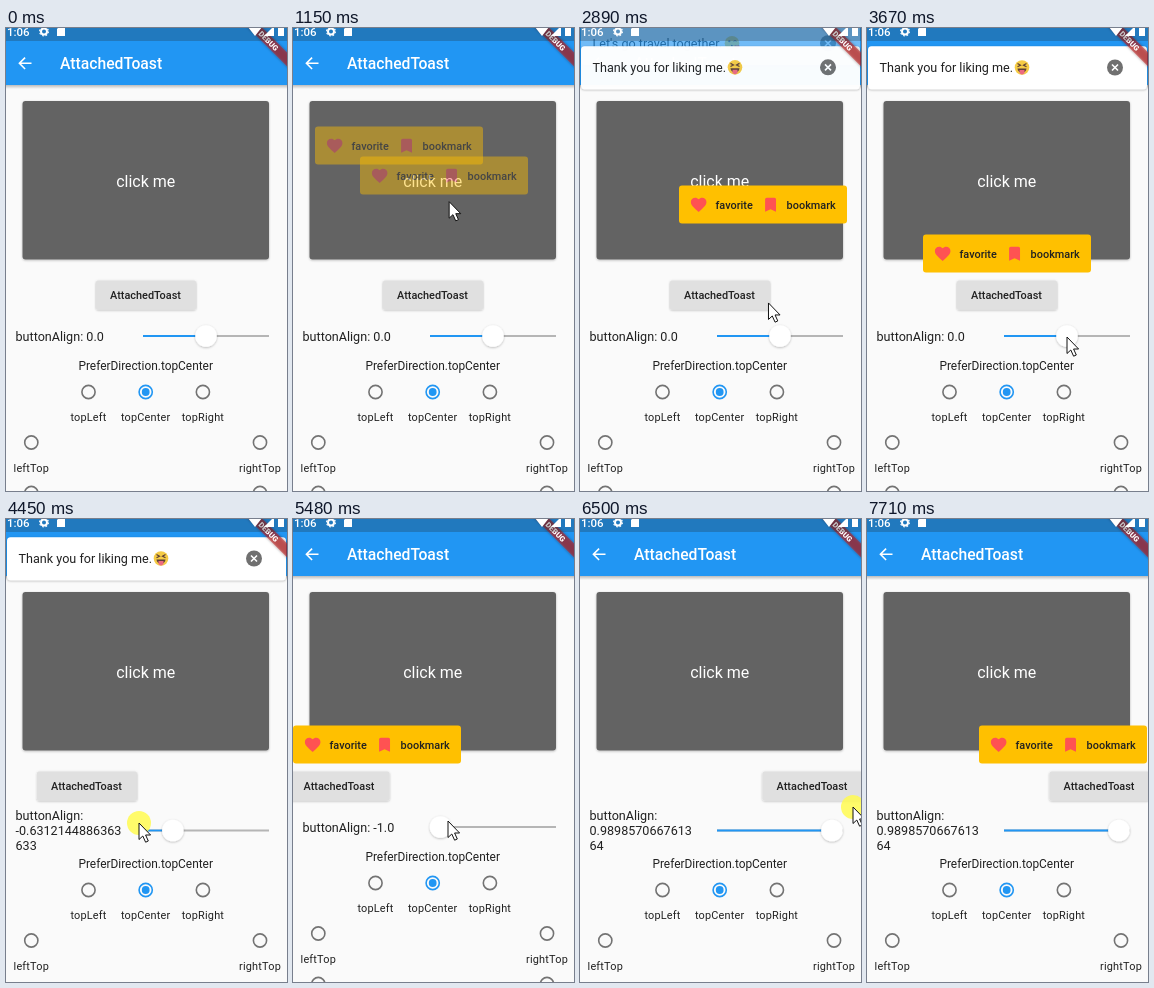
Write an HTML page that moves like this. It is 281 by 463 pixels and loops after 8000 ms.

```html
<!DOCTYPE html>
<html lang="en">
<head>
<meta charset="utf-8">
<title>AttachedToast</title>
<style>
html, body { margin: 0; width: 100%; height: 100%; overflow: hidden; background: #fafafa; }
svg { display: block; width: 281px; height: 463px; font-family: Roboto, sans-serif; fill: #212121; }
.bold { font-weight: 500; }
.mid { text-anchor: middle; }
.small { letter-spacing: .2px; }
.white { fill: #fff; }
</style>
</head>
<body>
<svg id="stage" viewBox="0 0 281 463"></svg>
<script>
const LOOP = 8000, WIDTH = 281, BLUE = '#2196f3';
const TOAST_W = 168, TOAST_H = 38, KNOB = 200, REACH = 52.5;

// What the pointer does, in order; a slide also has an end point.
const gestures = [
  { at: 660, x: 106, y: 139, on: 'box' },
  { at: 960, x: 151, y: 169, on: 'box' },
  { at: 1330, x: 183, y: 198, on: 'box' },
  { at: 1960, x: 200, y: 178, on: 'toast', shows: 'travel' },
  { at: 2400, x: 121, y: 178, on: 'toast', shows: 'like' },
  { at: 2910, x: 188.5, y: 275, on: 'button' },
  { at: 4080, x: 200, y: 309, on: 'slider', to: [133, 304], hold: 540 },
  { at: 4960, x: 47, y: 270, on: 'button' },
  { at: 5740, x: 155, y: 302, on: 'slider', to: [273, 288], hold: 800 },
  { at: 6840, x: 216, y: 265, on: 'button', hold: 150 }
].map(g => ({ hold: 100, ...g }));
gestures.forEach(g => { g.end = g.at + g.hold; });

// Keys are [time, ...values]; eased between neighbours, held at the ends.
const alignKeys = [
  [4200, 0], [4420, -0.6312144886363633], [4480, -0.6312144886363633], [4620, -1],
  [5850, -1], [6400, 0.989857066761364]
];

const clamp = (x, lo = 0, hi = 1) => Math.min(hi, Math.max(lo, x));
const smooth = x => x * x * (3 - 2 * x);
const ramp = (t, from, span) => clamp((t - from) / span);

function track(t, keys) {
  const i = keys.findIndex(k => k[0] > t);
  if (i < 0) return keys[keys.length - 1].slice(1);
  if (i === 0) return keys[0].slice(1);
  const [t0, ...a] = keys[i - 1], [t1, ...b] = keys[i];
  const p = smooth((t - t0) / (t1 - t0));
  return a.map((v, j) => v + (b[j] - v) * p);
}

const alignAt = t => track(t, alignKeys)[0];
const buttonX = v => 90 + v * 93.5;

// The pointer travels at a rate set by distance and rests until the next gesture.
function pointerPath() {
  const keys = [[50, 213, 424]];
  const travel = (x, y, latest) => {
    const [t, x0, y0] = keys[keys.length - 1];
    keys.push([Math.min(latest, t + 200 + 1.4 * Math.hypot(x - x0, y - y0)), x, y]);
  };
  for (const { at, end, x, y, to } of gestures) {
    travel(x, y, at);
    if (to) keys.push([at + 100, x, y], [end - 170, ...to]);
    keys.push([end + 30, ...(to || [x, y])]);
  }
  travel(246, 468, LOOP);
  return keys;
}
const path = pointerPath();
const gone = path[path.length - 1][0];

// A tap on the box or button opens a toast; the next tap elsewhere closes it.
const toasts = gestures.filter(g => g.on === 'box' || g.on === 'button').map(g => {
  const next = gestures.find(n => n.at > g.at && n.on !== 'toast');
  const box = g.on === 'box';
  const centre = box ? g.x : buttonX(alignAt(g.at)) + 50;
  return {
    x: clamp(centre - TOAST_W / 2, 0, WIDTH - TOAST_W - 1),
    y: box ? g.y - 40.5 : 206.5,
    open: g.end,
    close: next ? next.at + 100 : LOOP
  };
});

// A newer notice pushes the older one out.
const notices = gestures.filter(g => g.shows).map((g, i, all) => {
  const open = g.end + 70, next = all[i + 1];
  return { id: g.shows, open, close: next ? next.end + 290 : open + 2200 };
});

const text = (x, y, size, str, cls = '') => `<text x="${x}" y="${y}" font-size="${size}" class="${cls}">${str}</text>`;

const radio = (x, y, on) =>
  `<circle cx="${x}" cy="${y}" r="6.6" fill="none" stroke="${on ? BLUE : '#737373'}" stroke-width="1.6"/>` +
  (on ? `<circle cx="${x}" cy="${y}" r="3.9" fill="${BLUE}"/>` : '');

const option = (x, y, label) => radio(x, y, label === 'topCenter') + text(x, y + 29, 10.9, label, 'mid small');

const icon = (x, y, d) => `<path transform="translate(${x} ${y}) scale(.78)" fill="#ff5252" d="${d}"/>`;

const toast = ({ x, y }) => `<g class="toast" transform="translate(${x} ${y})">
  <rect width="${TOAST_W}" height="${TOAST_H}" rx="3" fill="#ffc000"/>
  ${icon(10.3, 9.8, 'M12 21.3l-1.400-1.300C5.400 15.400 2 12.300 2 8.500 2 5.400 4.400 3 7.500 3c1.700 0 3.400.8 4.500 2.100C13.100 3.800 14.800 3 16.500 3 19.600 3 22 5.400 22 8.500c0 3.800-3.400 6.900-8.600 11.500Z')}
  ${text(36.5, 23, 10.9, 'favorite', 'bold')}
  ${icon(82.2, 9.8, 'M17 3H7q-2 0-2 2v16l7-3 7 3V5q0-2-2-2Z')}
  ${text(107.6, 23, 10.9, 'bookmark', 'bold')}</g>`;

const laugh = `<path d="M-4.500-4l3 1.700-3 1.500M4.500-4l-3 1.700 3 1.500" fill="none" stroke="#5d4037" stroke-width="1.200"/>
  <path d="M-4.500 1h9q-.5 4-4.500 4t-4.500-4Z" fill="#5d4037"/><path d="M-2.500 2.500h5v3q-2.500 3-5 0Z" fill="#ec6a80"/>`;
const kiss = `<circle cx="-2.700" cy="-2" r="1.100" fill="#5d4037"/>
  <path d="M1.500-2q1.500-1.500 3 0M-1 2q3 .5 .5 1.500 2.500 1 0 2" fill="none" stroke="#5d4037"/>
  <path d="M5 6q-4-3-2-4 1.500-.5 2 1 .5-1.500 2-1 2 1-2 4Z" fill="#f44336"/>`;

const notice = (id, msg, faceX, face) => `<g id="${id}">
  <rect x="1" y="18.300" width="279" height="43" rx="3.500" fill="#fff" filter="url(#soft)"/>
  ${text(12.5, 44, 12.6, msg)}
  <g transform="translate(${faceX} 39.500)"><circle r="7.300" fill="#f5cb45"/>${face}</g>
  <circle cx="248" cy="39.500" r="8" fill="#707070"/>
  <path d="M245 36.500l6 6m0-6l-6 6" stroke="#fff" stroke-width="1.600"/></g>`;

const stage = document.getElementById('stage');
stage.innerHTML = `
<defs>
  <filter id="soft" x="-10%" y="-20%" width="120%" height="150%"><feDropShadow dx="0" dy=".8" stdDeviation="1" flood-opacity=".28"/></filter>
  <filter id="deep" x="-10%" y="-80%" width="120%" height="260%"><feDropShadow dx="0" dy="0" stdDeviation="1.600" flood-opacity=".6"/></filter>
  <linearGradient id="edge" x2="0" y2="1"><stop stop-opacity=".25"/><stop offset="1" stop-opacity="0"/></linearGradient>
</defs>
<rect width="281" height="463" fill="#fafafa"/>
<rect y="57" width="281" height="4" fill="url(#edge)"/>
<rect width="281" height="57" fill="${BLUE}"/>
<path d="M25.500 35.300h-12m5.600-5.700l-5.700 5.700 5.700 5.700" fill="none" stroke="#fff" stroke-width="1.600"/>
${text(54, 41, 15.7, 'AttachedToast', 'bold white')}
<rect x="16.500" y="73" width="246.500" height="158.500" rx="3" fill="#636363" filter="url(#soft)"/>
${text(139.7, 158.8, 16, 'click me', 'mid white')}
<g id="button"><rect y="252.500" width="100" height="29" rx="2" fill="#e0e0e0" filter="url(#soft)"/>
${text(49.5, 271, 10.9, 'AttachedToast', 'bold mid')}</g>
<g id="label">${text(9.5, 0, 12.6, '').repeat(3)}</g>
<g id="slider">
  <path d="M137 308H263" stroke="#b5b5b5" stroke-width="1.800"/>
  <path id="fill" stroke="${BLUE}" stroke-width="1.800"/>
  <circle id="thumb" cy="308" r="10.800" fill="#fff" filter="url(#soft)"/>
</g>
<g id="options">
  ${text(139.7, 341.5, 11.9, 'PreferDirection.topCenter', 'mid')}
  ${['topLeft', 'topCenter', 'topRight'].map((s, i) => option(82.5 + 57.2 * i, 364, s)).join('')}
  ${['leftTop', 'rightTop'].map((s, i) => option(25.3 + 228.7 * i, 414.5, s) + radio(25.3 + 228.7 * i, 465)).join('')}
</g>
${toasts.map(toast).join('')}
${notice('travel', 'Let\'s go travel together.', 152, kiss)}
${notice('like', 'Thank you for liking me.', 155, laugh)}
<g transform="translate(262.600 13) rotate(45)">
  <rect x="-40" y="-4.900" width="80" height="9.800" fill="#b71c1c" fill-opacity=".63" filter="url(#deep)"/>
  <g font-weight="900">${text(0, 2.7, 7.6, 'DEBUG', 'mid white')}</g>
</g>
<rect width="281" height="13" fill-opacity=".25"/>
${text(1, 8, 11.5, '1:06', 'bold white')}
<g fill="none" stroke="#fff"><circle cx="38" cy="3.500" r="3" stroke-width="2"/>
<circle cx="38" cy="3.500" r="4.400" stroke-width="1.200" stroke-dasharray="1.700 1.750"/></g>
<path d="M53-1h6v9h-8v-7Z M242-1h14l-7 9Z M258 8h10v-10Z M272-1h6v9h-6Z" fill="#fff"/>
<g id="cursor">
  <circle id="press" r="12" fill="#fffa50" fill-opacity=".85"/>
  <path d="M0 0V16.500L3.800 13 6.600 19.200 9.300 18 6.600 12H11.600Z" fill="#fff" stroke="#111"/>
</g>`;

const $ = Object.fromEntries([...stage.querySelectorAll('[id]')].map(e => [e.id, e]));
const lines = [...$.label.children];
const cards = [...stage.querySelectorAll('.toast')];

const move = (el, x, y) => el.setAttribute('transform', `translate(${x} ${y})`);
const show = (el, on) => { el.style.display = on ? '' : 'none'; };

function fade(el, a) {
  el.setAttribute('opacity', a);
  show(el, a > 0);
}

function setAlign(v) {
  const str = Number.isInteger(v) ? v.toFixed(1) : String(v);
  const long = str.length > 6;
  const cut = v < 0 ? 16 : 15;
  const rows = long ? ['buttonAlign:', str.slice(0, cut), str.slice(cut)] : ['buttonAlign: ' + str, '', ''];
  lines.forEach((el, i) => {
    el.textContent = rows[i];
    el.setAttribute('y', (long ? 301.3 : 312.5) + i * 14.9);
  });
  const x = KNOB + v * REACH;
  $.thumb.setAttribute('cx', x);
  $.fill.setAttribute('d', `M137 308H${x}`);
  move($.button, buttonX(v), 0);
  move($.slider, 0, long ? 3.5 : 0);
  move($.options, 0, long ? 7 : 0);
}

function draw(t) {
  setAlign(alignAt(t));
  toasts.forEach(({ open, close }, i) => fade(cards[i], ramp(t, open, 210) * (1 - ramp(t, close, 165))));
  for (const { id, open, close } of notices) {
    const enter = ramp(t, open, 330), leave = ramp(t, close, 250);
    move($[id], 0, -60 * (1 - smooth(enter) + leave));
    fade($[id], enter * (1 - leave) ** 2);
  }
  move($.cursor, ...track(t, path));
  show($.cursor, t >= 50 && t < gone);
  show($.press, gestures.some(g => t >= g.at && t < g.end));
}

const start = performance.now();
function tick() {
  draw((performance.now() - start) % LOOP);
  requestAnimationFrame(tick);
}
tick();
</script>
</body>
</html>
```
